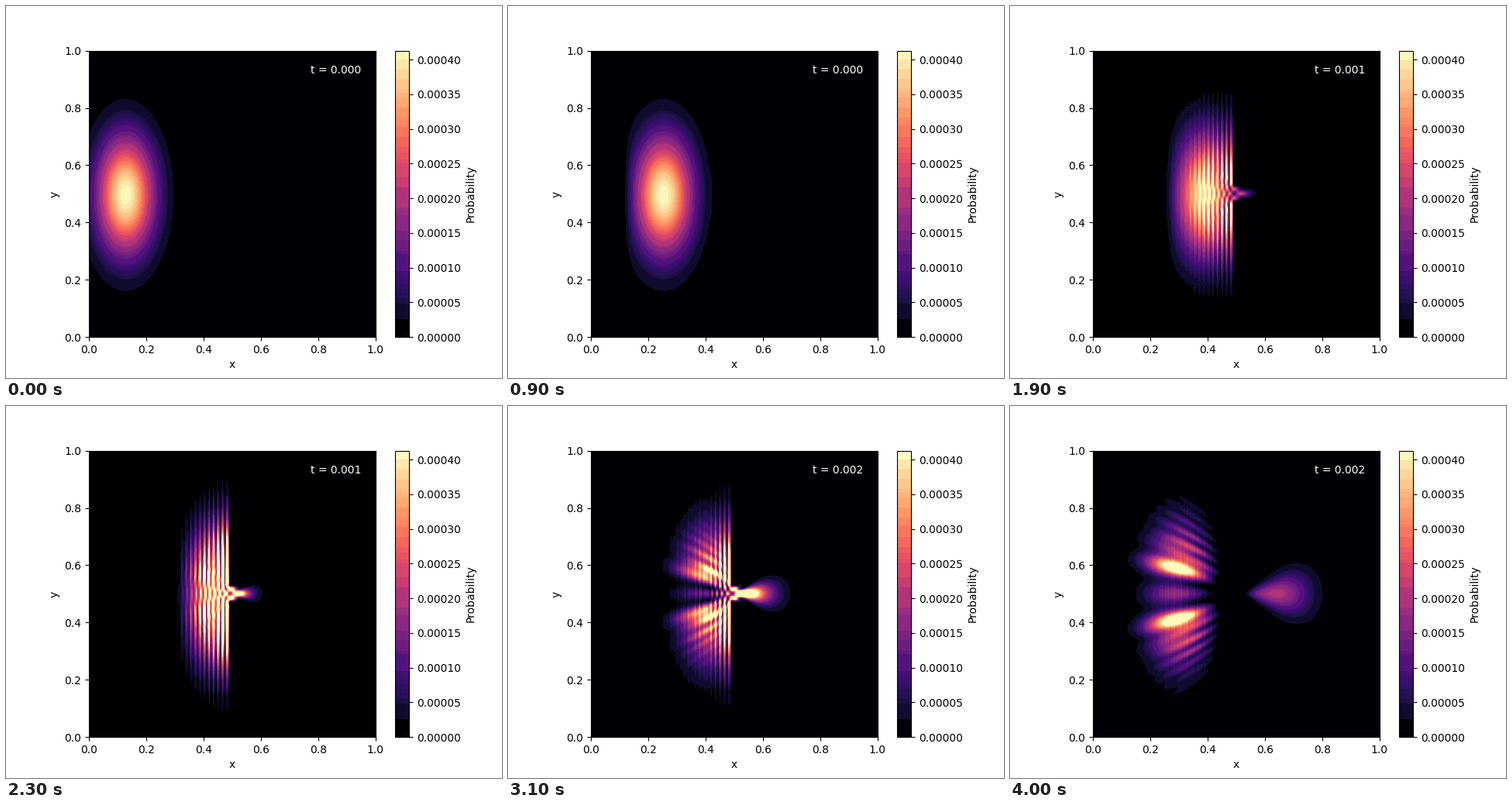
Animation, 640 px wide and 480 px high, one loop 4.1 s. Source, as a matplotlib script:

```python
"""A Gaussian wave packet meets a wall with a single slit."""
import matplotlib.pyplot as plt
import numpy as np
from matplotlib.animation import FuncAnimation
from matplotlib.colors import ListedColormap
from numpy.polynomial import chebyshev

H = 0.005            # grid spacing
DT = 2.5e-5          # time step
POINTS = 201         # grid points per side, borders included
FRAMES = 41
STEPS_PER_FRAME = 2
TERMS = 30

CENTER = (0.125, 0.5)
WIDTH = (0.1, 0.2)
MOMENTUM = 200


def open_cells():
    """1 where the wave may go, 0 on the border and in the wall."""
    n = np.arange(POINTS)
    mask = np.ones((POINTS, POINTS))
    mask[[0, -1], :] = 0
    mask[:, [0, -1]] = 0
    wall = abs(n - 100) <= 2
    slit = abs(n - 100) <= 5
    mask[np.ix_(~slit, wall)] = 0
    return mask


def packet(mask):
    pos = (np.arange(POINTS) - 1) * H
    x, y = np.meshgrid(pos, pos)
    dx, dy = x - CENTER[0], y - CENTER[1]
    envelope = np.exp(-dx**2 / (2 * WIDTH[0]**2) - dy**2 / (2 * WIDTH[1]**2))
    wave = envelope * np.exp(1j * MOMENTUM * dx) * mask
    return wave / np.sqrt(np.sum(abs(wave)**2))


def cayley(s):
    """Crank-Nicolson factor, with the spectrum scaled to [-1, 1]."""
    r = DT / (2 * H**2)
    e = 4 * r * (1 + s)
    return (1 - 1j * e) / (1 + 1j * e)


COEFS = chebyshev.chebinterpolate(cayley, TERMS)


def scaled_energy(u, mask):
    out = np.zeros_like(u)
    out[1:-1, 1:-1] = u[:-2, 1:-1] + u[2:, 1:-1] + u[1:-1, :-2] + u[1:-1, 2:]
    return -0.25 * out * mask


def step(u, mask):
    older, newer = u, scaled_energy(u, mask)
    total = COEFS[0] * older + COEFS[1] * newer
    for c in COEFS[2:]:
        older, newer = newer, 2 * scaled_energy(newer, mask) - older
        total += c * newer
    return total


def simulate():
    mask = open_cells()
    u = packet(mask)
    probs = []
    for _ in range(FRAMES):
        probs.append(abs(u[1:-1, 1:-1])**2)
        for _ in range(STEPS_PER_FRAME):
            u = step(u, mask)
    return probs


probs = simulate()
peak = probs[0].max()

# Colours that share a coarse RGB cell merge into one band.
lut = (plt.get_cmap("magma")(np.arange(256))[:, :3] * 255).astype(int)
cell = (lut[:, 0] >> 5) * 256 + (lut[:, 1] >> 4) * 16 + (lut[:, 2] >> 5)
band = np.unique(cell, return_inverse=True)[1]
CELL_AREA = 3.45     # screen pixels per grid cell
BAR_AREA = 26.7      # screen pixels per colour in the colour bar


def banded_map(prob):
    """Magma in flat bands, each the mean colour of its visible pixels."""
    index = np.clip(prob / peak * 256, 0, 255).astype(int)
    weight = np.bincount(index.ravel(), minlength=256) * CELL_AREA + BAR_AREA
    total = np.bincount(band, weight)
    means = [np.bincount(band, weight * ch) / total for ch in lut.T]
    return ListedColormap(np.stack(means, axis=1)[band] / 255)


fig, ax = plt.subplots(figsize=(6.4, 4.8), dpi=100)
img = ax.imshow(probs[0], extent=[0, 1, 0, 1], vmin=0, vmax=peak,
                cmap=banded_map(probs[0]))
ax.set_xlabel("x")
ax.set_ylabel("y")
bar = fig.colorbar(img, ax=ax)
bar.set_label("Probability")
clock = ax.text(0.95, 0.95, "", color="white", ha="right", va="top")


def draw(n):
    img.set_data(probs[n])
    img.set_cmap(banded_map(probs[n]))
    clock.set_text(f"t = {n * STEPS_PER_FRAME * DT + 1e-9:.3f}")
    return img, clock


anim = FuncAnimation(fig, draw, frames=FRAMES, interval=100, repeat=True)
plt.show()
```
